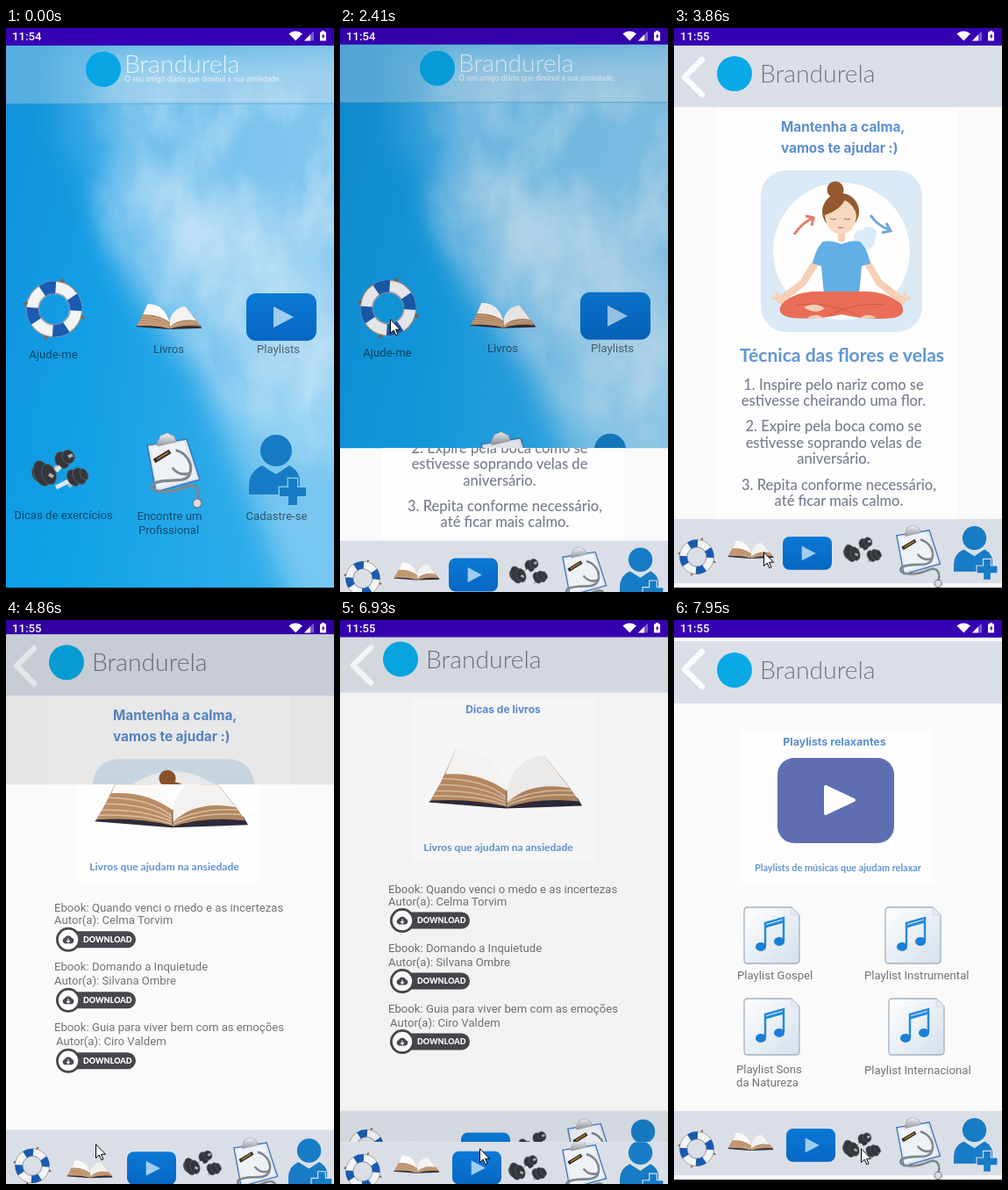
Animation of 374 by 642 pixels, one loop 8 s. Source, as an HTML page:

```html
<!DOCTYPE html>
<html lang="pt-BR">
<head>
<meta charset="utf-8">
<title>Aplicativo de bem-estar</title>
<style>
html, body { margin: 0; width: 100%; height: 100%; overflow: hidden; background: #000; }
#stage { position: fixed; inset: 0; overflow: hidden; contain: strict; }
svg { position: absolute; left: 0; top: 0; width: 374px; height: 642px; overflow: visible; }
text { font-family: Roboto, sans-serif; font-size: 13.15px; fill: rgba(0, 0, 0, .54); }
.mid { text-anchor: middle; }
.brand { font: 300 28.3px Lato, sans-serif; fill: #70757d; }
.light { fill: #fff; opacity: .75; }
.tagline { font: 8.5px Lato, sans-serif; fill: #eaf4fb; }
.head { font-family: Inter, sans-serif; font-weight: 700; fill: #5b8fd0; }
.sub { font-family: Lato, sans-serif; font-weight: 700; fill: #6295d3; }
.step { font: 500 16.5px Lato, sans-serif; fill: #777d90; text-anchor: middle; }
.clock { font-weight: 500; fill: #fff; }
.pill { font: 900 9px Lato, sans-serif; fill: #fff; }
#home { --gap: #7cc5ee; }
.page { --gap: #dadfe7; }
</style>
</head>
<body>
<div id="stage">
<svg style="width:0;height:0">
  <defs>
    <linearGradient id="sky" x2="1" y2=".3">
      <stop offset="0" stop-color="#1291da"/><stop offset=".4" stop-color="#19a0e6"/><stop offset="1" stop-color="#58b7eb"/>
    </linearGradient>
    <linearGradient id="deep" x2="0" y2="1">
      <stop offset="0" stop-color="#0f8bd6" stop-opacity=".2"/><stop offset=".5" stop-color="#0398e2" stop-opacity=".2"/><stop offset="1" stop-color="#03a4ea" stop-opacity=".5"/>
    </linearGradient>
    <linearGradient id="blue" x2="0" y2="1"><stop offset="0" stop-color="#0b78d6"/><stop offset="1" stop-color="#0767c3"/></linearGradient>
    <linearGradient id="tile" x2="1" y2="1"><stop offset="0" stop-color="#fff"/><stop offset="1" stop-color="#d3dfec"/></linearGradient>
    <linearGradient id="steel" x2="0" y2="1"><stop offset="0" stop-color="#f4f6f8"/><stop offset="1" stop-color="#8f969d"/></linearGradient>
    <filter id="soft" x="-40%" y="-40%" width="180%" height="180%"><feGaussianBlur stdDeviation="15"/></filter>
    <filter id="wisps" x="0" y="0" width="100%" height="100%">
      <feTurbulence type="fractalNoise" baseFrequency=".018 .01" numOctaves="5" seed="8"/>
      <feColorMatrix values="0 0 0 0 .84  0 0 0 0 .92  0 0 0 0 .98  2.6 0 0 0 -1"/>
    </filter>
    <mask id="cloudy"><path d="M110 60H390V500L320 490 220 370 130 260 105 190Z" fill="#fff" filter="url(#soft)"/></mask>

    <g id="buoy">
      <circle r="24.5" fill="none" stroke="#a9adb6" stroke-width="15"/>
      <circle r="25" fill="none" stroke="#f1f3f6" stroke-width="13"/>
      <circle r="24.7" fill="none" stroke="#1a5bb0" stroke-width="14" pathLength="360" stroke-dasharray="38 52" transform="rotate(-34)"/>
      <circle r="31.6" fill="none" stroke="#ad8a69" pathLength="360" stroke-dasharray="52 38" transform="rotate(4)"/>
      <path d="M-31-8l-3 3M8-31l3-3M31 8l3 3M-8 31l-3 3" stroke="#80634b" stroke-width="3"/>
      <circle r="18" fill="none" stroke="#7d8694" stroke-opacity=".4" stroke-width="1.5"/>
    </g>
    <g id="book">
      <path d="M0 63L88 70 175 67 170 58 88 62 10 54Z" fill="#2d2a39"/>
      <path d="M2 61L14 40 31 3Q80 20 89 50V68Q50 58 2 61Z" fill="#b98c66"/>
      <path d="M89 50L132 10 160 45 172 62Q125 57 89 69Z" fill="#b08662"/>
      <path d="M31 3C54 1 80 14 89 50 68 35 45 29 19 31Z" fill="#fbfaf8"/>
      <path d="M89 50C94 25 112 10 132 10L161 47C132 41 106 47 89 64Z" fill="#f4f2f0"/>
      <path d="M16 36Q65 37 88 57M12 43Q60 43 88 60M8 50Q56 49 88 63M5 56Q52 54 88 66M163 50Q122 47 90 63M167 55Q122 52 90 66" fill="none" stroke="#dcbf9f" stroke-width="1.5"/>
      <path d="M89 50V66" stroke="#6b4f3c"/>
    </g>
    <g id="play"><rect width="80" height="54" rx="11" fill="url(#blue)"/><path d="M31 15L54 27 31 39Z" fill="#9fcdf0"/></g>
    <g id="bell">
      <path d="M20 29L40 13M42 42L58 30" stroke="#b4bac0" stroke-width="6"/>
      <g fill="#33363b" stroke="#5f646a" stroke-width=".8">
        <ellipse cx="6" cy="29" rx="5" ry="9" transform="rotate(-20 6 29)"/>
        <ellipse cx="12" cy="28" rx="9" ry="15" transform="rotate(-20 12 28)"/>
        <ellipse cx="20" cy="29" rx="8" ry="12" transform="rotate(-20 20 29)"/>
        <ellipse cx="35" cy="13" rx="8" ry="10" transform="rotate(-24 35 13)"/>
        <ellipse cx="42" cy="9" rx="7" ry="8" transform="rotate(-24 42 9)"/>
        <ellipse cx="48" cy="33" rx="7" ry="10" transform="rotate(-28 48 33)"/>
        <ellipse cx="55" cy="31" rx="7" ry="10" transform="rotate(-28 55 31)"/>
        <ellipse cx="60" cy="29" rx="4" ry="7" transform="rotate(-28 60 29)"/>
      </g>
      <path d="M28 25L33 20M28 44L42 37" stroke="#e1e4e7" stroke-width="5"/>
      <path d="M20 29l5 3M42 9l5-2" stroke="#a6acb2" stroke-width="4"/>
    </g>
    <g id="clip">
      <path d="M1 14L46 7 61 53 11 67Z" fill="#dfe5ee" stroke="#3f78ba" stroke-width="1.6"/>
      <path d="M4 16L43 10 57 51 13 63Z" fill="#eef1f5"/>
      <path d="M12 12L16 3 24 0 32 4 34 10 13 15Z" fill="url(#steel)" stroke="#9299a0" stroke-width=".7"/>
      <path d="M9 32L27 21" stroke="#33302c" stroke-width="5"/><path d="M12 30L25 22" stroke="#d38a2d" stroke-width="1.4"/>
      <g fill="none">
        <path id="tube" d="M34 20C44 22 54 34 50 46 46 60 22 50 8 58 0 68 26 70 44 62 58 56 62 66 58 79M50 46Q38 50 30 40" stroke="#7f878f" stroke-width="2.6"/>
        <use href="#tube" transform="translate(-.4 -.5)" style="stroke:#c9ced4"/>
      </g>
      <circle cx="58" cy="80" r="5" fill="#d8dde1" stroke="#6d747b" stroke-width="1.2"/>
    </g>
    <g id="person" fill="#177cc5">
      <circle cx="31" cy="18" r="18"/>
      <path d="M0 68V58Q0 42 15 35L31 45 46 35Q56 40 58 50V68Z"/>
      <path d="M45 50H55V60H65V70H55V80H45V70H35V60H45Z" stroke="var(--gap)" stroke-width="3" paint-order="stroke"/>
    </g>
    <g id="song">
      <path d="M4 0H54L63 9V60Q63 64 59 64H4Q0 64 0 60V4Q0 0 4 0Z" fill="url(#tile)" stroke="#a4b1bf" stroke-width="1.3"/>
      <path d="M54 0V9H63Z" fill="#e5ecf3" stroke="#c0cad5" stroke-width=".6"/>
      <path d="M24 44V18L45 12V38" fill="none" stroke="#2389dc" stroke-width="2.4"/>
      <path d="M24 22L45 16" stroke="#2389dc" stroke-width="3"/>
      <ellipse cx="19" cy="45" rx="6" ry="5" fill="#1c7fd6"/><ellipse cx="40" cy="39" rx="6" ry="5" fill="#1c7fd6"/>
    </g>
    <g id="download">
      <rect x="8" y="5" width="84" height="19" rx="9.5" fill="#47474d"/>
      <circle cx="15" cy="14.5" r="12.6" fill="#fff" stroke="#47474d" stroke-width="2.8"/>
      <path d="M11 19a3.4 3.4 0 0 1 0-6.5 4.4 4.4 0 0 1 8 0 3.4 3.4 0 0 1 0 6.5Z" fill="#47474d"/>
      <path d="M15 13v4m-2-1.5l2 2 2-2" stroke="#fff" stroke-width="1.2" fill="none"/>
      <text class="pill" x="32" y="17.8">DOWNLOAD</text>
    </g>
  </defs>
</svg>
<svg id="home"></svg>
<svg id="calm" class="page"></svg>
<svg id="books" class="page"></svg>
<svg id="lists" class="page"></svg>
<svg id="top">
  <text id="clock" class="clock" x="7" y="14">11:54</text>
  <path d="M322.5 6.5Q330 .5 338 6.5L330.3 14.5Z" fill="#fff"/>
  <path d="M340 14.5L351 3.5V14.5Z" fill="#fff" fill-opacity=".35"/><path d="M340 14.5L347 7.5V14.5Z" fill="#fff"/>
  <path d="M358 4.5H360V3H363V4.5H365V14.5H358Z" fill="#fff"/><path d="M362.3 6L360 10H361.3V12.8L363.6 8.8H362.3Z" fill="#3700b3"/>
  <g id="pointer">
    <circle id="press" r="12" fill="#ff0" fill-opacity=".47"/>
    <path d="M.5 .8V16.5L4.2 13 6.8 18.7 9 17.7 6.5 12.2H11.5Z" fill="#fff" stroke="#000"/>
  </g>
</svg>
</div>
<script>
const $ = id => document.getElementById(id);
const BRAND = 'Brandurela';

const icon = (name, x, y, scale = 1) =>
  `<use href="#${name}" transform="translate(${x} ${y}) scale(${scale})"/>`;
const label = (x, y, words, cls = '', size = 0) =>
  `<text class="${cls}" x="${x}" y="${y}"${size ? ` style="font-size:${size}px"` : ''}>${words}</text>`;
const rect = (x, y, w, h, fill, more = '') =>
  `<rect x="${x}" y="${y}" width="${w}" height="${h}" fill="${fill}" ${more}/>`;

// The status bar reaches above the screen so that a lowered screen leaves no gap.
const bars = rect(0, -30, 374, 50, '#3700b3') + rect(0, 637, 374, 6, '#000');
const navIcons = [['buoy', .62], ['book', .3], ['play', .7], ['bell', .67], ['clip', .83], ['person', .76]];

function page({ top, bottom, shift, arrow, nav, body }) {
  const [ax, ay] = arrow;
  return rect(0, 0, 374, 642, '#fafafa') + rect(0, top, 374, bottom - top, '#dadfe7') +
    `<path d="M${ax + 20} ${ay - 20}L${ax} ${ay}L${ax + 20} ${ay + 20}" fill="none" stroke="#fafbfc" stroke-width="6.5" stroke-linecap="round" stroke-linejoin="round"/>` +
    `<circle cx="69" cy="${52 + shift}" r="20" fill="#08a9e6"/>` +
    label(98, 62 + shift, BRAND, 'brand') + body +
    rect(0, 559, 374, 73, '#dadfe7') + bars +
    nav.map(([x, y], i) => icon(navIcons[i][0], x, y, navIcons[i][1])).join('');
}

$('home').innerHTML =
  rect(0, 0, 374, 642, 'url(#sky)') + rect(0, 0, 374, 642, 'url(#deep)') +
  `<g filter="url(#soft)">
    <path d="M60 20H200L120 200 60 130Z" fill="#8ccbf0" fill-opacity=".25"/>
    <path d="M115 30H400V500L320 490 240 420 190 360 135 285 100 205 122 140Z" fill="#a9d5f3" fill-opacity=".62"/>
    <path d="M130 170L300 190 390 300V440L290 400 200 300Z" fill="#c8e2f6" fill-opacity=".45"/>
    <path d="M220 400L400 390V670H330L290 560Z" fill="#a3d7f5" fill-opacity=".6"/>
  </g>` +
  rect(0, 0, 374, 642, '#fff', 'filter="url(#wisps)" mask="url(#cloudy)" opacity=".4"') +
  rect(0, 20, 374, 66, '#cfdfec', 'fill-opacity=".36"') + rect(0, 85.5, 374, 1, '#4b9dcc', 'fill-opacity=".7"') +
  '<circle cx="111" cy="47" r="20" fill="#07a5e3"/>' +
  label(135, 51, BRAND, 'brand light') +
  label(135, 61, 'O seu amigo diário que diminui a sua ansiedade.', 'tagline') +
  icon('buoy', 55, 320) + icon('book', 148, 313, .43) + icon('play', 274, 302) +
  icon('bell', 29, 479) + icon('clip', 160, 461) + icon('person', 277, 463) +
  label(54, 375.5, 'Ajude-me', 'mid') + label(185.5, 370, 'Livros', 'mid') + label(310.5, 370, 'Playlists', 'mid') +
  label(65.5, 559, 'Dicas de exercícios', 'mid') + label(186.5, 560, 'Encontre um', 'mid') +
  label(185.5, 576, 'Profissional', 'mid') + label(308.5, 560, 'Cadastre-se', 'mid') + bars;

const woman = `
  <rect x="99" y="162" width="184" height="184" rx="29" fill="#d9e9f5"/>
  <circle cx="191" cy="254" r="78" fill="#fefefe"/>
  <g fill="#d9ebf8"><circle cx="213" cy="238" r="8"/><circle cx="222" cy="235" r="9"/><circle cx="220" cy="243" r="9"/></g>
  <g fill="none" stroke="#f6cfb5" stroke-width="8" stroke-linecap="round">
    <path d="M164 263L147 290 121 310M218 263L234 290 260 310M191 215V240"/>
    <path d="M121 310l-8-3m8 3l-4-8M260 310l8-3m-8 3l4-8" stroke-width="3.5"/>
  </g>
  <path d="M170 243Q180 241 191 246 202 241 212 243 220 250 224 268L214 271 211 304H171L168 271 158 268Q162 250 170 243Z" fill="#62afe6"/>
  <path d="M171 300Q140 298 123 314 115 327 135 330 165 332 191 326 220 333 250 330 266 327 259 314 240 298 211 300Z" fill="#ea6d57"/>
  <path d="M140 315Q175 311 210 327M240 315Q210 311 176 327" fill="none" stroke="#cf5847"/>
  <path d="M148 318q12-7 24 1-10 8-24-1M152 330q10-7 20 1M211 331q10-8 20-1" fill="#f6cfb5"/>
  <circle cx="184" cy="184" r="9.5" fill="#95592f"/>
  <ellipse cx="190" cy="209" rx="21" ry="21" fill="#95592f"/>
  <path d="M172 213Q188 208 195 196 206 202 208 213 207 233 190 235 174 233 172 213Z" fill="#f9d8c1"/>
  <path d="M178 217q4 2 7 0m9 0q4 2 7 0m-14 10q3 1 6 0" fill="none" stroke="#a5664e"/>
  <path d="M137 235Q146 222 157 217m-7-3l9 2-2 9" fill="none" stroke="#e57a69" stroke-width="3"/>
  <path d="M224 213Q232 225 246 230m-4-8l5 9-10 2" fill="none" stroke="#6ea8dc" stroke-width="3"/>`;

const steps = [[411.5, '1. Inspire pelo nariz como se'], [430, 'estivesse cheirando uma flor.'],
  [459, '2. Expire pela boca como se'], [477.5, 'estivesse soprando velas de'], [496, 'aniversário.'],
  [525.5, '3. Repita conforme necessário,', 188], [543.5, 'até ficar mais calmo.', 188]];

$('calm').innerHTML = page({
  top: 20, bottom: 90, shift: 0, arrow: [12, 56],
  nav: [[26, 602], [61, 583], [124, 579], [193, 579], [253, 566], [319, 567]],
  body: rect(48, 90, 276, 469, '#fdfdfd') +
    label(122, 118, 'Mantenha a calma,', 'head', 15.3) + label(122, 142, 'vamos te ajudar :)', 'head', 15.3) + woman +
    label(191.5, 380, 'Técnica das flores e velas', 'sub mid', 21.1) +
    steps.map(([y, words, x = 182]) => label(x, y, words, 'step')).join('')
});

const ebooks = [[311, 325, 55, 328, 'Quando venci o medo e as incertezas', 'Celma Torvim'],
  [378, 394, 55, 397, 'Domando a Inquietude', 'Silvana Ombre'],
  [447, 463, 57, 466, 'Guia para viver bem com as emoções', 'Ciro Valdem']];

$('books').innerHTML = page({
  top: 20, bottom: 83, shift: -7, arrow: [15, 52],
  nav: [[30, 600], [69, 593], [138, 584], [202, 582], [259, 568], [322, 569]],
  body: rect(81, 90, 209, 186, '#fdfdfd') +
    label(186, 106, 'Dicas de livros', 'head mid', 12) + icon('book', 101, 145) +
    label(180.5, 263.5, 'Livros que ajudam na ansiedade', 'sub mid', 12.1) +
    ebooks.map(([y1, y2, x, y3, name, author]) =>
      label(55, y1, 'Ebook: ' + name) + label(x, y2, 'Autor(a): ' + author) + icon('download', 56, y3)).join('')
});

$('lists').innerHTML = page({
  top: 24, bottom: 95, shift: 5, arrow: [12, 56],
  nav: [[26, 602], [61, 583], [128, 579], [192, 583], [253, 566], [319, 567]],
  body: rect(77, 125, 219, 175, '#fdfdfd') +
    label(183, 143, 'Playlists relaxantes', 'head mid', 12.4) +
    rect(118, 157, 133, 97, '#5f6eb1', 'rx="19"') +
    '<path d="M173 190L205 205 173 220Z" fill="#fff" stroke="#fff" stroke-width="4" stroke-linejoin="round"/>' +
    label(187, 286, 'Playlists de músicas que ajudam relaxar', 'sub mid', 10.9) +
    [[80, 327], [241, 327], [80, 431], [245, 431]].map(([x, y]) => icon('song', x, y)).join('') +
    label(72, 408.5, 'Playlist Gospel') + label(217, 408.5, 'Playlist Instrumental') +
    label(71, 515.5, 'Playlist Sons') + label(71, 530.5, 'da Natureza') + label(217, 516.5, 'Playlist Internacional')
});

// Cubic Bézier through explicit points, solved for y at a given x.
function curve(...p) {
  const at = (u, k) => (1 - u) ** 3 * p[0][k] + 3 * u * (1 - u) ** 2 * p[1][k] + 3 * u * u * (1 - u) * p[2][k] + u ** 3 * p[3][k];
  return x => {
    let lo = 0, hi = 1;
    for (let i = 0; i < 24; i++) {
      const mid = (lo + hi) / 2;
      if (at(mid, 0) < x) lo = mid; else hi = mid;
    }
    return at(lo, 1);
  };
}
const slide = curve([0, 0], [.4, 0], [.2, 1], [1, 1]);
const rise = curve([0, 0], [.05, 0], [.1333, .06], [.1667, .4]);
const settle = curve([.1667, .4], [.2083, .82], [.25, 1], [1, 1]);
const reveal = x => x < .1667 ? rise(x) : settle(x);

const LOOP = 8000, TICK = 67.5, OPEN = 425;
const screens = ['home', 'calm', 'books', 'lists'].map($);
const opens = [{ at: 2410, lead: 63 }, { at: 4790, lead: 30 }, { at: 6930, lead: 39 }];
const presses = [[1610, 1880], [4190, 4320], [6270, 6470]];
const path = [[240, 287, 630], [520, 196, 476], [800, 62, 354], [870, 31, 345], [1010, 44, 337], [1150, 57, 331],
  [2891, 57, 331], [3160, 82, 400], [3440, 109, 510], [3720, 104, 587], [3860, 102, 596],
  [5130, 102, 596], [5480, 159, 601], [7600, 159, 601], [7950, 213, 601]];

function pointerAt(t) {
  const i = path.findLastIndex(k => k[0] <= t);
  const a = path[i], b = path[i + 1];
  if (!b) return a.slice(1);
  const f = Math.floor((t - a[0]) / 69) * 69 / (b[0] - a[0]);
  return [1, 2].map(k => Math.round(a[k] + (b[k] - a[k]) * f));
}

function show(el, y, clip, opacity) {
  el.style.visibility = 'visible';
  el.style.transform = `translateY(${y}px)`;
  el.style.clipPath = clip > 2 ? `inset(${clip}px 0 0 0)` : 'none';
  el.style.opacity = opacity;
}

function render(t) {
  screens.forEach(s => s.style.visibility = 'hidden');
  const n = opens.findLastIndex(o => o.at <= t);
  if (n < 0) show(screens[0], 0, 0, 1);
  else {
    const { at, lead } = opens[n];
    const tick = Math.floor((t - at) / TICK);
    const age = tick > 4 ? OPEN : lead + tick * TICK;
    const x = Math.min(1, age / OPEN), moved = slide(x);
    if (x < 1) show(screens[n], -20 * moved, 0, 1 - .1 * Math.min(1, age / 117));
    show(screens[n + 1], x < 1 ? 26.3 * (1 - moved) : 0, x < 1 ? 615.7 * (1 - reveal(x)) : 0, 1);
  }
  $('clock').textContent = t < 3380 ? '11:54' : '11:55';
  const visible = t >= path[0][0];
  $('pointer').style.display = visible ? '' : 'none';
  if (visible) $('pointer').setAttribute('transform', `translate(${pointerAt(t)})`);
  $('press').style.display = presses.some(([a, b]) => t >= a && t < b) ? '' : 'none';
}

const start = performance.now();
function loop() {
  render((performance.now() - start) % LOOP);
  requestAnimationFrame(loop);
}
render(0);
requestAnimationFrame(loop);
</script>
</body>
</html>
```
